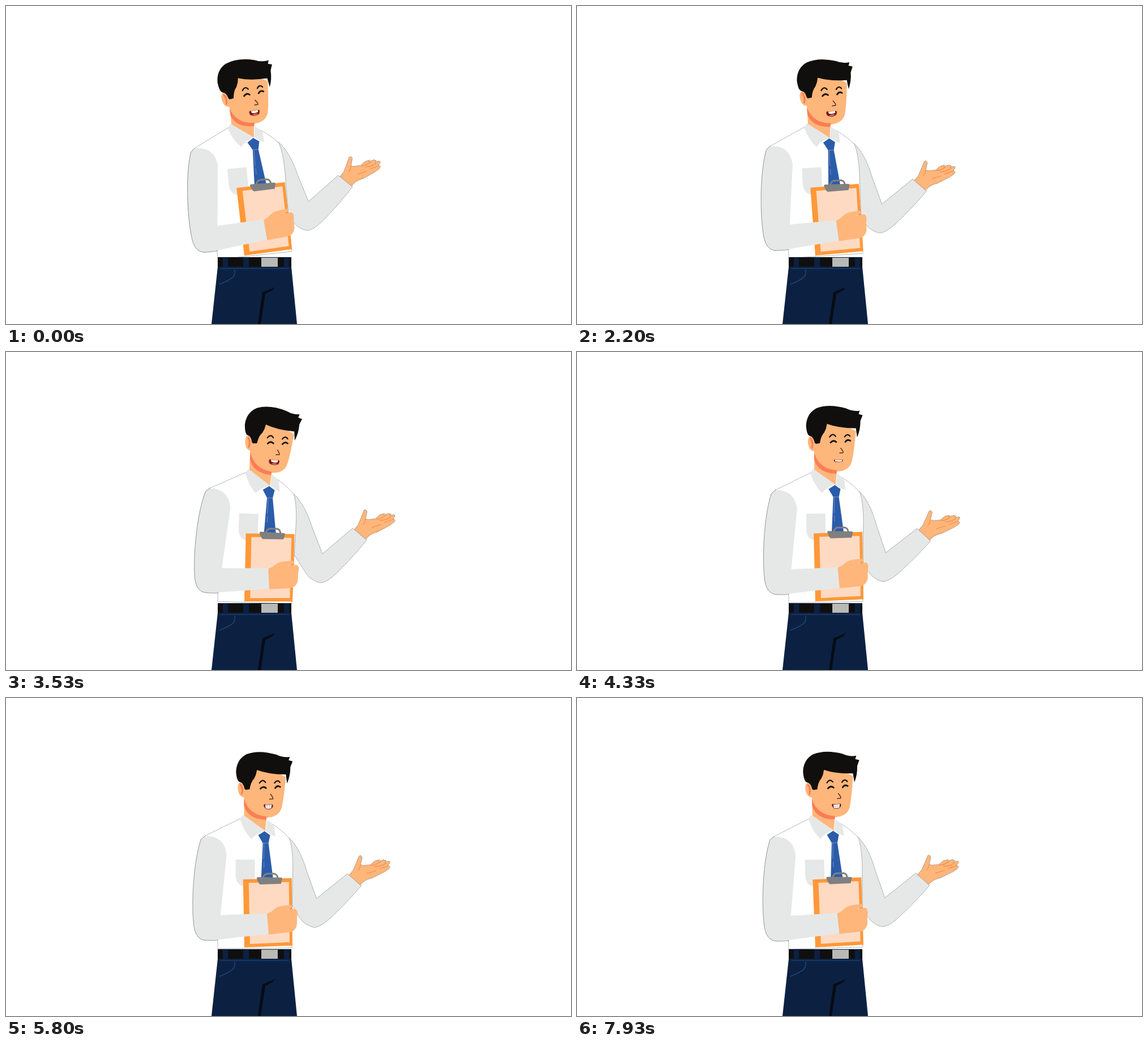
Animation, 998 px wide and 561 px high, one loop 8000 ms. Source, as an HTML page:

```html
<!DOCTYPE html>
<html lang="en">
<head>
<meta charset="utf-8">
<title>Presenter</title>
<style>
  html, body { margin: 0; width: 100%; height: 100%; overflow: hidden; background: #fff; }
  svg { display: block; width: 100vw; height: 100vh; }
  .skin { fill: #ffb67a; }
  .sleeve { fill: #e6e8e8; }
  .edge { stroke: #444; stroke-width: .7; stroke-dasharray: 1.6 1.4; }
  .line { fill: none; stroke-linecap: round; stroke-linejoin: round; }
  .ink { stroke: #15110f; }
  .crease { stroke: #f58a45; stroke-width: 1.1; }
</style>
</head>
<body>
<svg viewBox="0 0 998 561">
  <g id="torso">
    <g id="arm">
      <path class="skin edge" d="M613 300L620 289L624 275L627 263Q630 259 633 264L632 276Q634 279 640 277L649 275L656 267L664 264L663 267L671 263L676 264L674 267L681 264Q685 266 680 271L684 274L682 278Q676 284 668 289L655 298Q640 303 635 316Z"/>
      <path class="line crease" d="M632 277Q632 283 629 288M645 291L660 284M650 276Q660 274 666 267M657 277Q668 276 676 268M666 280L681 272"/>
      <path class="sleeve edge" d="M495 246L501 248Q522 263 540 303L563 347L611 296L638 314Q615 350 590 380Q575 397 565 398Q545 396 533 378L507 346L495 335Z"/>
    </g>
    <path class="edge" fill="#fff" d="M416 212L352 243L374 428V442L505 441L506 345L507 300Q507 265 501 248Q490 235 470 222L459 234Z"/>
    <path class="skin" d="M421 172V208L458 235L461 208Z"/>
    <path class="sleeve" d="M419 206L458 234Q441 239 434 249Q421 236 414 214ZM461 215Q469 219 474 227L476 244Q468 242 459 234Z"/>
    <path class="sleeve" d="M406 285H440V318Q440 331 429 332H420Q407 330 406 314Z"/>
    <path fill="#2a5caa" d="M457 235L467 242L464 256L472 318H451L454 256L446 242Z"/>
    <path class="line" stroke="#8a8fc4" stroke-width=".9" d="M454 256H464M456 257L455.5 284M456 289V299"/>
    <path fill="#ff9838" d="M419 320L505 318L506 437L421 440Z"/>
    <path fill="#fedac2" d="M429 326L500 325L501 431L431 434Z"/>
    <path class="line" stroke="#808080" stroke-width="3" d="M454 318Q456 311 461 310H474Q479 311 480 317"/>
    <path fill="#808080" d="M443 318Q443 316 446 316L486 317Q489 317 488 320L486 328L449 329Q446 327 443 318Z"/>
    <path class="sleeve" d="M345 249Q349 243 358 243Q387 246 390 277L379 383L462 380L465 416L385 425Q360 428 350 427Q335 424 332 402Q328 370 332 320Q336 275 345 249Z"/>
    <path class="line edge" d="M374 427Q360 428 350 427Q335 424 332 402Q328 370 332 320Q336 275 345 249L352 243"/>
    <path class="skin" d="M461 381L469 377Q478 368 488 367L504 365Q508 367 505 370L495 374L511 372Q517 375 514 386V400Q511 414 497 414L464 417Z"/>
    <g id="head">
      <path class="skin" d="M422 149Q409 145 410 160Q412 175 421 175L423 186Q438 210 462 211Q482 210 487 195Q491 180 495 140L440 110Z"/>
      <path fill="#fb7d56" d="M421 178Q430 207 461 209L460 215Q428 214 421 190Z"/>
      <path class="line" stroke="#fb7d56" stroke-width="3" d="M415 153Q420 160 417 169"/>
      <path fill="#100f0d" d="M424 162L431 161Q433 148 439 142Q443 135 444 127Q465 135 495 135L497 151Q503 138 503 122L507 112L500 110L502 104Q490 106 478 100Q448 91 426 99Q408 108 407 130Q408 146 413 148Q420 149 422 160Z"/>
      <g class="line ink">
        <path stroke-width="2.8" d="M450 160Q455 154.500 460 159M476 159Q480 153.500 485 157"/>
        <path stroke-width="2.200" d="M448.500 150Q454 142 459 149M475 150Q480 143 484.500 149"/>
        <path stroke-width="1.500" stroke="#5a2a18" d="M468 170Q473 176 472 178L466 178.500"/>
      </g>
      <g id="mouth" transform="translate(464 191.500)">
        <g data-shape="w">
          <path fill="#741915" d="M-9.500 -2.500Q-8 -5 -5 -3.500Q0 -2.500 6 -4Q10 -4 9 0Q8 5 2 5.500Q-6 6 -9 2Z"/>
          <path fill="#f26a4f" d="M-5 4Q0 0 6 3Q3 6 -5 4Z"/>
          <path fill="#fff" d="M-6 -3.500Q0 -2 6.500 -4L6 0Q0 2 -5 0Z"/>
        </g>
        <g data-shape="s">
          <path fill="#3a0f0d" d="M-5 -1Q-2 -4 1 -3Q5 -3 5 0Q4 6 0 5.500Q-4 5 -5 -1Z"/>
          <path fill="#ee4b42" d="M-3 2.500Q0 0 4 2Q1 6 -3 2.500Z"/>
          <path fill="#fff" d="M-3 -2H4V0H-3Z"/>
        </g>
        <g data-shape="t">
          <path fill="#741915" d="M-8.500 -1.500Q0 0 7.500 -1.500L7 2Q0 4 -7.500 2Z"/>
          <path fill="#fff" d="M-6.500 -1Q0 0 6 -1V1.800Q0 3 -6 1.500Z"/>
        </g>
        <g data-shape="g">
          <path fill="#741915" d="M-8.500 -2.500Q-6 -4.500 -4 -3.500Q0 -2.500 5 -4Q9 -4 8 0Q6 5 0 5Q-7 5 -8.500 -2.500Z"/>
          <path fill="#fff" d="M-5.500 -3Q0 -2 6 -3.500L5 3Q0 5 -5 3Z"/>
          <path class="line" stroke="#b9aaa5" stroke-width=".6" d="M-5 .5Q0 1.500 5 0M-2 -2V4M2 -2V4"/>
        </g>
      </g>
    </g>
  </g>
  <path fill="#0c2142" d="M374 443H504V460L514 561H363L374 460Z"/>
  <path fill="#100f0e" d="M374 444H383V460H374ZM392 444H419V460H392ZM429 444H451V460H429ZM480 444H491V460H480ZM500 444H504V460H500Z"/>
  <path fill="#b9b9b6" d="M451 444H480V460H451Z"/>
  <path class="line" stroke="#1f4f85" stroke-width="1.200" d="M379 463H499M404 465Q405 476 399 480Q390 486 377 491"/>
  <path fill="#070b14" d="M475 496L471 501L458 508L450 561H445L453 505Z"/>
</svg>
<script>
  const LOOP = 8000, FPS = 15;
  const part = id => document.getElementById(id);

  // [seconds, degrees]
  const sway = [[0, -5.6], [1.2, .6], [2.45, -3.6], [3.6, 2.25], [4.95, -2.5], [6.2, .6], [7.3, -3.5], [8.5, .6]];
  const nod = [[0, -2.9], [1.1, 0], [2.4, -1.2], [3.6, 2.5], [4.4, 0], [4.95, -1], [5.9, 0], [7.3, -1.6], [8.5, 0]];
  const reach = [[0, 5.3], [1.1, 0], [2.4, 8], [3.5, 6.4], [4.4, 9], [6.2, 7.7], [7.3, 9], [8.5, 7.7]];
  const speech = "wwtsgwtsswgtwstwwgstwgtswtwwsgtwtsgwwtsgwstggwtswgtwsgwtswgg";

  function sample(keys, t) {
    const i = keys.findIndex(key => key[0] > t);
    const [t0, a] = keys[i - 1], [t1, b] = keys[i];
    return a + (b - a) * (1 - Math.cos(Math.PI * (t - t0) / (t1 - t0))) / 2;
  }

  function turn(id, angle, x, y) {
    part(id).setAttribute("transform", `rotate(${angle} ${x} ${y})`);
  }

  function draw(ms) {
    const step = Math.min(LOOP / 1000 * FPS - 1, Math.floor(ms * FPS / 1000 + .1));
    const t = step / FPS, lean = sample(sway, t);
    turn("torso", lean, 424, 441);
    turn("head", sample(nod, t), 447, 196);
    turn("arm", sample(reach, t) - lean, 505, 248);
    const shape = speech[step >> 1];
    for (const el of part("mouth").children) {
      el.style.display = el.dataset.shape === shape ? "" : "none";
    }
  }

  const start = performance.now();
  function tick() {
    draw((performance.now() - start) % LOOP);
    requestAnimationFrame(tick);
  }
  tick();
</script>
</body>
</html>
```
